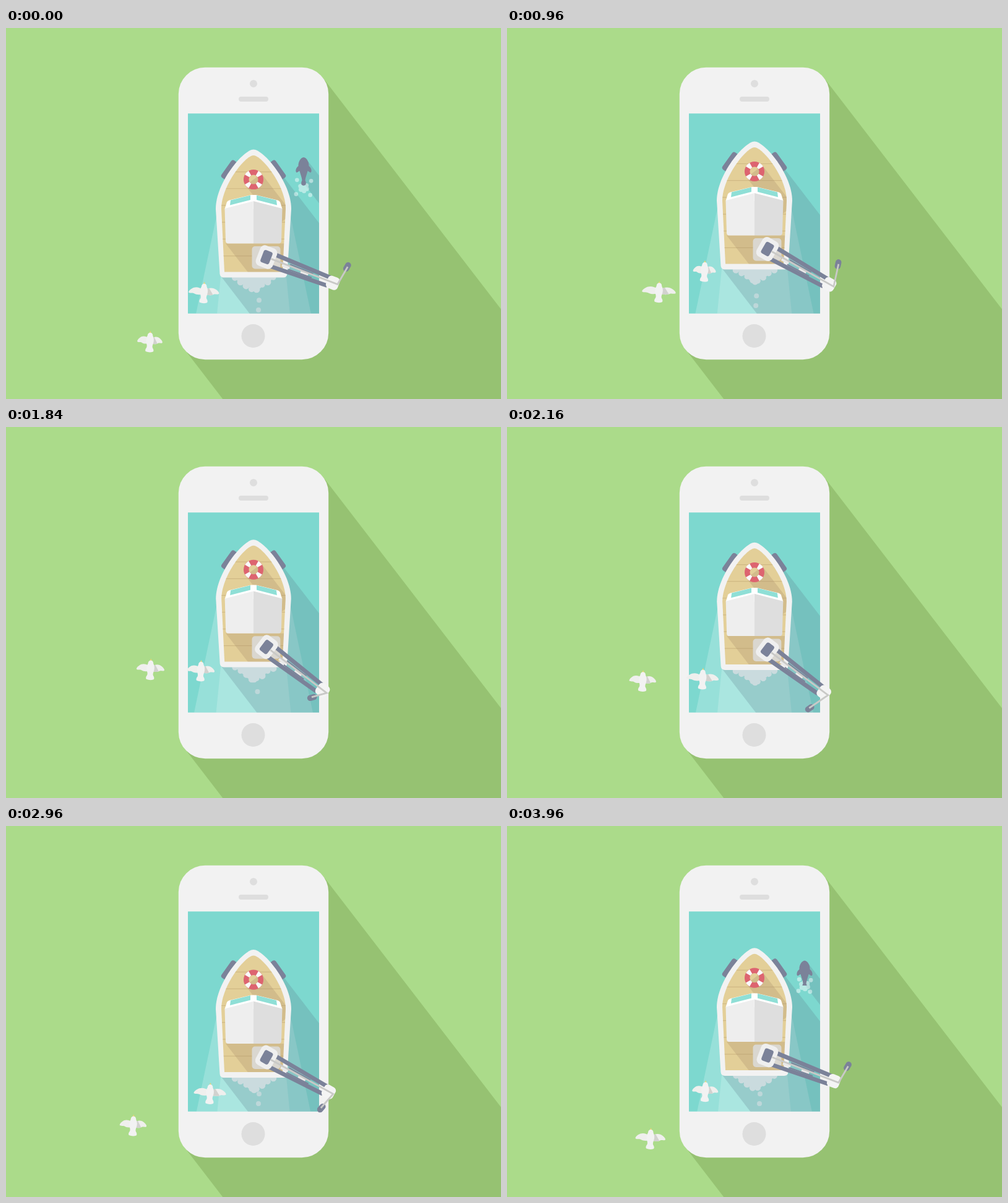
An HTML page with a canvas for the animation above (4 s loop, 800x600 px).

```html
<!DOCTYPE html>
<html lang="en">
<head>
<meta charset="utf-8">
<title>Boat on a phone</title>
<style>
  html, body { margin: 0; width: 100%; height: 100%; overflow: hidden; background: #abdb8a; }
  canvas { display: block; width: 800px; height: 600px; }
</style>
</head>
<body>
<canvas id="stage" width="800" height="600"></canvas>
<script>
const ctx = document.getElementById('stage').getContext('2d');
const LOOP = 4000, STEP = 40, SLOPE = 1.3, TAU = Math.PI * 2;
const WHITE = '#f2f2f2', GREY = '#dedede', SLATE = '#7b8299', WATER = '#7dd8cf';
const SEA_SHADE = 'rgba(93,124,139,.25)', DECK_SHADE = 'rgba(160,132,100,.25)';

// Looping motion: a mean plus harmonics, each given as [amplitude, phase].
const wave = (mean, ...harmonics) => t => harmonics.reduce(
  (sum, [amp, phase], i) => sum + amp * Math.cos((i + 1) * t / LOOP * TAU - phase), mean);
const flap = t => t / LOOP * 15 * TAU;
const since = (t, start) => (t - start + 2 * LOOP) % LOOP;

const boatY = wave(294.5, [10.8, -.94], [-.8, 0]);
const boatScale = t => .992 + .008 * Math.cos(4 * t / LOOP * TAU);
const armAngle = wave(29.2, [-8.3, -.11]);
const hookX = wave(1, [26, .5]);
const hookY = wave(-3, [-36, .9]);
const gulls = [
  {
    x: wave(228.6, [20.1, 1.42], [4.8, -1.2]),
    y: wave(436.6, [61.4, -.44], [15.2, 1.57], [6.8, 1.87]),
    span: t => 55 - 14 * ((1 + Math.cos(flap(t) - .08)) / 2) ** 3
  },
  {
    x: wave(321.8, [5.9, -1.15], [3.9, -2.75]),
    y: wave(396.3, [24.8, -.98], [2.9, 1.3]),
    span: t => 45 + 8 * Math.cos(flap(t) - .94)
  }
];

function fill(color, path) {
  ctx.fillStyle = color;
  ctx.fill(typeof path === 'string' ? new Path2D(path) : path);
}
function poly(color, ...pts) {
  fill(color, 'M' + pts.map(p => p.join()).join('L') + 'Z');
}
function box(color, x, y, w, h, r) {
  const p = new Path2D();
  p.roundRect(x, y, w, h, r);
  fill(color, p);
}
function dots(color, list) {
  const p = new Path2D();
  for (const [x, y, r] of list) {
    p.moveTo(x + r, y);
    p.arc(x, y, r, 0, TAU);
  }
  fill(color, p);
}
function line(color, width, ...pts) {
  ctx.strokeStyle = color;
  ctx.lineWidth = width;
  ctx.stroke(new Path2D('M' + pts.map(p => p.join()).join('L')));
}
function ring(color, x, y, r, width, from = 0, to = TAU) {
  ctx.strokeStyle = color;
  ctx.lineWidth = width;
  ctx.beginPath();
  ctx.arc(x, y, r, from, to);
  ctx.stroke();
}
function group(x, y, angle, scale, draw) {
  ctx.save();
  ctx.translate(x, y);
  ctx.rotate(angle);
  ctx.scale(scale, scale);
  draw();
  ctx.restore();
}
function castShadow(color, a, b, reach) {
  const far = ([x, y]) => [x + reach, y + reach * SLOPE];
  poly(color, a, far(a), far(b), b);
}

function drawPhone() {
  ctx.fillStyle = '#abdb8a';
  ctx.fillRect(0, 0, 800, 600);
  castShadow('#96c272', [512.4, 80.8], [288, 519], 420);
  box(WHITE, 278.8, 63.8, 242.4, 472.4, 43);
  dots(GREY, [[400, 90, 6], [399.5, 498, 19]]);
  box(GREY, 376, 111, 48, 8, 4);
}

function drawWake(t, y) {
  const stern = y + 102, depth = 200;
  const cone = (color, top, half, slope) => poly(color, [400 - half, top], [400 + half, top],
    [400 + half + depth * slope, top + depth], [400 - half - depth * slope, top + depth]);
  cone('rgba(255,255,255,.2)', y + 5, 60, .21);
  cone('rgba(255,255,255,.18)', stern, 53, .1);

  const foam = [], bubbles = [];
  for (let row = 0; row < 4; row++) {
    const half = 31 - 9 * row, count = 8 - 2 * row;
    for (let i = 0; i <= count; i++) {
      const wobble = Math.sin(t / LOOP * TAU * 10 + i * 2.1 + row);
      foam.push([401 - half + 2 * half * i / count, stern + 2 + 6 * row + wobble, 5 + wobble * .5]);
    }
  }
  for (let i = 0; i < 16; i++) {
    const pair = i >> 1;
    const fallen = .175 * since(t, pair * 500 - 230 - (i % 2) * 90);
    if (fallen > 14) bubbles.push([402 + 7 * Math.cos(pair * pair * .35) - i % 2, 400 + fallen, 4]);
  }
  dots('rgba(255,255,255,.8)', foam);
  dots('rgba(255,255,255,.6)', bubbles.filter(b => b[1] > stern + 24));
}

function drawSplash(t, x, y, start) {
  const age = since(t, start) / 420;
  if (age >= 1) return;
  const size = 1 - age ** 3, spread = 24 * (1 - (1 - age) ** 2);
  const around = (count, turn, radius, r) => Array.from({ length: count }, (_, i) => {
    const a = turn + i * TAU / count;
    return [x + radius * Math.cos(a), y + radius * Math.sin(a), r * size];
  });
  dots('rgba(255,255,255,.45)',
    [[x, y, 7 * size], ...around(6, .4, 5.5, 4), ...around(4, .85, spread, 3.6)]);
}

function drawFish(t) {
  const top = 273 - .2125 * since(t, 3700);
  const high = 163, low = 258;
  const upper = Math.max(top + 6, high), lower = Math.min(top + 43, low);
  if (lower > upper) castShadow(SEA_SHADE, [488, upper], [482, lower], 40);
  drawSplash(t, 481, 258, 3820);
  drawSplash(t, 480, 168, 320);
  ctx.save();
  ctx.beginPath();
  ctx.rect(440, high, 66, low - high);
  ctx.clip();
  ctx.translate(481, top);
  for (const side of [-1, 1]) {
    ctx.save();
    ctx.scale(side, 1);
    fill(SLATE, 'M-.3 0C5 0 9 8 8.5 14C13 17 13.5 23 11.5 24.5C9 24 7.5 22 6.5 22C5 28 3 32 2.5 37'
      + 'C5 42 4 46-.3 45.5Z');
    ctx.restore();
  }
  ctx.restore();
}

function drawScreen(t, y, scale) {
  ctx.save();
  ctx.beginPath();
  ctx.rect(294, 138.3, 212, 323.4);
  ctx.clip();
  ctx.fillStyle = WATER;
  ctx.fillRect(294, 138, 212, 324);
  drawWake(t, y);
  castShadow(SEA_SHADE, [400 + 48 * scale, y - 60 * scale], [400 - 53 * scale, y + 101 * scale], 200);
  drawFish(t);
  ctx.restore();
}

// Boat parts are placed around (400, 299.5).
function drawBoat() {
  for (const side of [-1, 1])
    group(400 + side * 39, 229, side * -.62, 1, () => box(SLATE, -6, -17, 12, 34, 4));
  fill(WHITE, 'M400 196C416 196 461 249 461 292L454.5 397Q454 403 448 403H352Q346 403 345.5 397'
    + 'L339 292C339 249 384 196 400 196Z');

  const deck = new Path2D('M400 205.5C413 205.5 452 254 452 292L447 394H353L348 292C348 254 387 205.5 400 205.5Z');
  ctx.save();
  fill('#e3cf98', deck);
  ctx.clip(deck);
  for (let i = 0; i < 6; i++) line('#d0b984', 1.2, [345, 232 + i * 27.2], [455, 232 + i * 27.2]);
  castShadow(DECK_SHADE, [412.7, 234.7], [387.3, 254.3], 50);
  poly(DECK_SHADE, [355, 348], [391.5, 395], [455, 395], [455, 348]);
  ctx.restore();

  // Lifebuoy
  ring('#dd6470', 400, 244.5, 11.8, 8.5);
  for (let i = 0; i < 4; i++) {
    const a = (i + .5) * TAU / 4;
    ring('#fafafa', 400, 244.5, 11.8, 8.5, a - .27, a + .27);
  }

  // Cabin, one half at a time
  for (const [side, roof] of [[-1, '#eeeeee'], [1, GREY]]) {
    ctx.save();
    ctx.translate(400, 0);
    ctx.scale(side, 1);
    fill('#fff', 'M-.3 269.5H4L39 278Q42 279 43 281L46.5 292H-.3Z');
    poly('#8fdfd6', [5, 270], [37, 278], [38, 286], [5, 277.5]);
    fill(roof, 'M0 279.5L46.5 291.5L45 344Q44.7 348 41 348H0Z');
    ctx.restore();
  }

  box('#dad7d0', 397.5, 352.5, 46, 36.5, 5);
}

function drawCrane(t) {
  const angle = armAngle(t) * Math.PI / 180;
  const at = d => [421 + d * Math.cos(angle), 370 + d * Math.sin(angle)];
  const joint = at(115), elbow = at(123);
  const tip = [joint[0] + hookX(t), joint[1] + hookY(t)];
  const lean = Math.atan2(tip[1] - elbow[1], tip[0] - elbow[0]);
  group(...tip, lean, 1, () => box(SLATE, -8.5, -5.5, 16, 9.6, 4.8));

  group(421, 370, angle, 1, () => {
    line(SLATE, 6.8, [13, -8.8], [109, -6]);
    line(SLATE, 6.8, [12, 11.5], [108, 8]);
    for (const x of [28, 60]) line('#e9e9e9', 5.5, [x, 2.5], [x + 13, 2.5]);
    for (const y of [-2.5, 6]) line(SLATE, 2, [40, y], [80, y * .8]);
    box('#efefef', -14.5, -17.5, 29, 35, 8);
    box(SLATE, -7.5, -10.5, 15, 21, 3.5);
    box('#f4f4f4', 105, -10, 20, 21, 6);
  });
  line('#c9c9c7', 2.8, at(8), elbow, tip);
}

function drawGull(t, { x, y, span }) {
  group(x(t), y(t), .05, 1, () => {
    const stretch = span(t) / 55;
    const wing = new Path2D('M-3 12C-9 8-17 8-22 11.5C-26 14-28 16.5-27 18C-24 19.5-21 18-18 19C-13 21.5-8 21-3 20Z');
    for (const side of [1, -1]) {
      ctx.save();
      ctx.scale(side * stretch, 1);
      fill('#efefed', wing);
      if (side < 0) {
        ctx.clip(wing);
        poly('#d2d2cf', [-4, 6], [-8, 8], [-18, 22], [-4, 22]);
      }
      ctx.restore();
    }
    poly('#ecd675', [0, -.5], [2, 4], [-2, 4]);
    fill(WHITE, 'M0 2.5C3 2.5 4.2 5 4.3 7.5C6.5 11 6.8 16 5.5 20C4.5 23 4 25 5 27C7 29.5 7 32 6 33.2'
      + 'Q0 35.5-6 33.2C-7 32-7 29.5-5 27C-4 25-4.5 23-5.5 20C-6.8 16-6.5 11-4.3 7.5C-4.2 5-3 2.5 0 2.5Z');
  });
}

function render(t) {
  const y = boatY(t), scale = boatScale(t);
  drawPhone();
  drawScreen(t, y, scale);
  group(400, y, 0, scale, () => {
    ctx.translate(-400, -299.5);
    drawBoat();
    drawCrane(t);
  });
  gulls.forEach(gull => drawGull(t, gull));
}

const start = performance.now();
function tick() {
  const t = Math.max(0, performance.now() - start) % LOOP;
  render(Math.floor(t / STEP) * STEP);
  requestAnimationFrame(tick);
}
tick();
</script>
</body>
</html>
```
